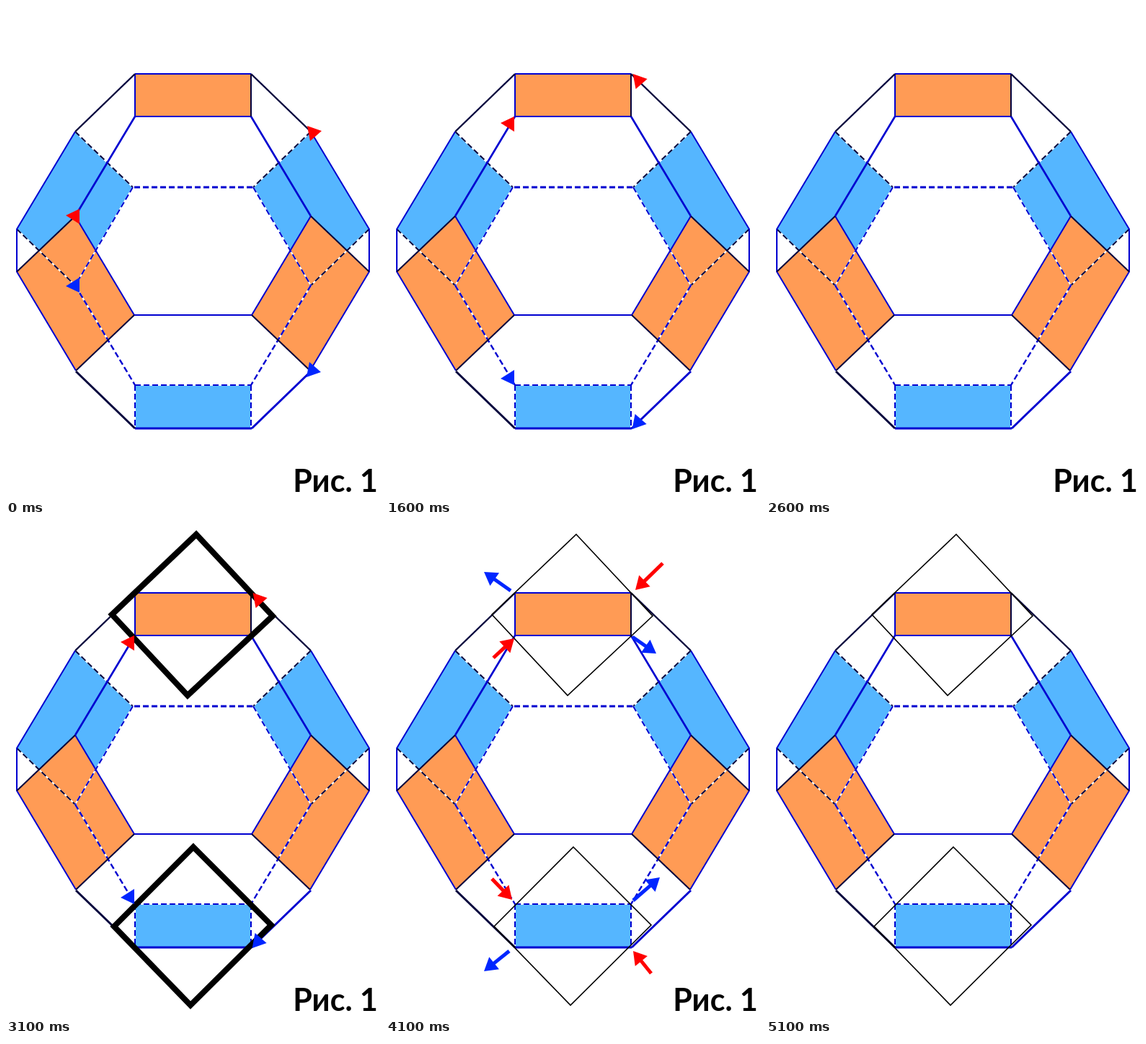
Recreate the animation shown at these times as an HTML page with a canvas. Size 519x680 px, loop 5.3 s.

```html
<!DOCTYPE html>
<html lang="ru">
<head>
<meta charset="utf-8">
<style>
html, body { margin: 0; width: 100%; height: 100%; overflow: hidden; background: #fff; }
canvas { display: block; }
</style>
</head>
<body>
<canvas id="stage" width="519" height="680"></canvas>
<script>
const ctx = document.getElementById('stage').getContext('2d');
const LOOP = 5300;
const NAVY = '#0000d0', DARK = '#00003c', BLACK = '#000';
const RED = '#f00', BLUE = '#0026ff', ORANGE = '#ff9b55', SKY = '#55b6ff';

function trace(points, closed) {
  ctx.beginPath();
  points.forEach(([x, y]) => ctx.lineTo(x, y));
  if (closed) ctx.closePath();
}

function fill(color, points) {
  trace(points, true);
  ctx.fillStyle = color;
  ctx.fill();
}

function stroke(color, width, points, closed = false) {
  trace(points, closed);
  ctx.strokeStyle = color;
  ctx.lineWidth = width;
  ctx.stroke();
}

function dashed(color, width, points) {
  stroke('#fff', width, points);
  ctx.setLineDash([8, 4]);
  stroke(color, width, points);
  ctx.setLineDash([]);
}

const mirror = points => points.map(([x, y]) => [519 - x, y]);

// Draws a shape on the left and its reflection on the right.
function both(draw, ...args) {
  const points = args.pop();
  draw(...args, points);
  draw(...args, mirror(points));
}

function drawSolid() {
  both(fill, SKY, [[96, 174], [176, 251], [96, 387], [15, 309]]);
  fill(SKY, [[179, 525], [340, 525], [340, 585], [179, 585]]);
  both(fill, ORANGE, [[96, 291], [178, 428], [97, 505], [15, 368]]);
  fill(ORANGE, [[179, 94], [340, 94], [340, 153], [179, 153]]);

  dashed(NAVY, 3, [[178, 251], [343, 251]]);
  both(dashed, DARK, 2, [[96, 174], [176, 251]]);
  both(dashed, DARK, 2, [[15, 309], [96, 387]]);
  both(dashed, NAVY, 2, [[176, 251], [96, 387]]);
  both(dashed, NAVY, 2.4, [[96, 387], [179, 525]]);
  both(dashed, NAVY, 2, [[179, 525], [179, 585]]);
  dashed(NAVY, 2, [[179, 525], [340, 525]]);

  both(stroke, NAVY, 2, [[96, 174], [15, 309], [15, 368], [97, 505]]);
  both(stroke, NAVY, 2.6, [[179, 153], [96, 291]]);
  both(stroke, NAVY, 2, [[96, 291], [178, 428]]);
  stroke(NAVY, 2, [[178, 428], [342, 428]]);
  stroke(NAVY, 2, [[179, 94], [340, 94]]);
  stroke(NAVY, 2, [[179, 153], [340, 153]]);
  stroke(NAVY, 2, [[179, 94], [179, 153]]);
  stroke(DARK, 2, [[340, 94], [340, 153]]);
  stroke(NAVY, 3, [[179, 585], [341, 585]]);
  both(stroke, DARK, 2.4, [[179, 94], [96, 174]]);
  both(stroke, DARK, 2, [[96, 291], [15, 368]]);
  both(stroke, DARK, 2, [[178, 428], [97, 505]]);
  stroke(DARK, 3, [[97, 506], [179, 585]]);
  stroke(NAVY, 3, [[423, 506], [341, 585]]);
}

// Tip position at each of the five steps of the sliding arrowheads.
const LEFT_X = [102, 123, 145, 161, 178];
const LEFT_Y = [281, 245, 208, 180, 153];

function drawHeads(step) {
  const head = (color, x, y, shape) =>
    fill(color, shape.map(([dx, dy]) => [x + dx, y + dy]));
  const flip = shape => shape.map(([dx, dy]) => [dx, -dy]);
  const left = [[0, 0], [-19, 9], [0, 21]];
  const right = [[0, 0], [20, 7], [4, 21]];
  const x = LEFT_X[step], y = LEFT_Y[step];
  const rx = 418 - 18.85 * step, ry = 166 - 18 * step;
  head(RED, x, y, left);
  head(RED, rx, ry, right);
  head(BLUE, x, 678 - y, flip(left));
  head(BLUE, rx - 1, 680 - ry, flip(right));
}

function drawSquares(width) {
  stroke(BLACK, width, [[264, 13], [370, 126], [252, 236], [147, 124]], true);
  stroke(BLACK, width, [[260, 446], [368, 554], [256, 665], [150, 556]], true);
}

function arrow(color, x1, y1, x2, y2) {
  const d = Math.hypot(x2 - x1, y2 - y1);
  const ux = (x2 - x1) / d, uy = (y2 - y1) / d;
  const bx = x2 - ux * 18, by = y2 - uy * 18;
  stroke(color, 5, [[x1, y1], [bx + ux, by + uy]]);
  fill(color, [[x2, y2], [bx - uy * 11, by + ux * 11], [bx + uy * 11, by - ux * 11]]);
}

function drawForces() {
  arrow(RED, 384, 53, 346, 90);
  arrow(RED, 149, 184, 178, 157);
  arrow(RED, 147, 490, 175, 519);
  arrow(RED, 368, 621, 343, 590);
  arrow(BLUE, 173, 91, 136, 65);
  arrow(BLUE, 342, 155, 375, 178);
  arrow(BLUE, 343, 520, 380, 488);
  arrow(BLUE, 171, 590, 136, 618);
}

function drawCaption() {
  ctx.fillStyle = BLACK;
  ctx.font = 'bold 43px Lato, "Open Sans", sans-serif';
  ctx.textAlign = 'right';
  ctx.fillText('Рис. 1', 516, 673);
}

function draw(t) {
  const blink = start => Math.floor((t - start) / 200) % 2 === 0;
  ctx.fillStyle = '#fff';
  ctx.fillRect(0, 0, 519, 680);
  drawSolid();
  if (t >= 2800) drawSquares(t >= 3100 && t < 3400 ? 8 : 1.6);
  if (t < 1200) drawHeads(Math.floor(t / 300));
  else if (t < 3700 && (t >= 2800 || blink(1200))) drawHeads(4);
  const forces = t >= 3700 && blink(3700);
  if (forces) drawForces();
  if (t < 3700 || forces) drawCaption();
}

const start = performance.now();
function tick() {
  draw((performance.now() - start) % LOOP);
  requestAnimationFrame(tick);
}
tick();
</script>
</body>
</html>
```
